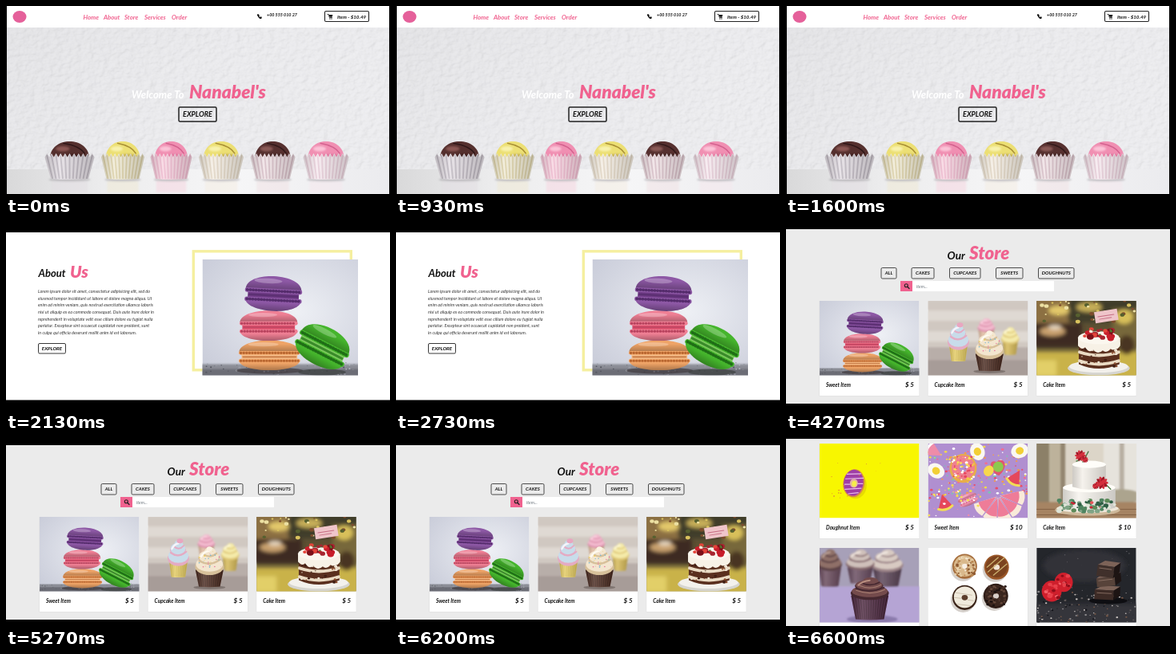
Write an HTML page that moves like this. It is 480 px wide and 236 px high and loops after 8000 ms.

```html
<!DOCTYPE html>
<html lang="en">
<head>
<meta charset="utf-8">
<title>Bakery site tour</title>
<style>
html, body { margin: 0; width: 480px; height: 236px; overflow: hidden; background: #000; }
#stage { display: block; }
text { font-family: Lato, "Open Sans", sans-serif; font-style: italic; font-weight: 700; fill: #111; }
.pink { fill: #f0628f; }
.big { font-weight: 900; }
.thin { font-weight: 400; }
.scene { opacity: 0; animation: 8s step-end infinite; }
#home { animation-name: home; }
#about { animation-name: about; }
#store { animation-name: store; }
#scrolled { animation-name: scrolled; }
@keyframes home { 0% { opacity: 1 } 26.625%, 100% { opacity: 0 } }
@keyframes about { 0% { opacity: 0 } 26.625% { opacity: 1 } 53.375%, 100% { opacity: 0 } }
@keyframes store { 0% { opacity: 0 } 53.375% { opacity: 1 } 80%, 100% { opacity: 0 } }
@keyframes scrolled { 0% { opacity: 0 } 80%, 100% { opacity: 1 } }
</style>
</head>
<body>
<svg id="stage" width="480" height="236" viewBox="0 0 480 236" xmlns="http://www.w3.org/2000/svg"></svg>
<script>
const box = (x, y, w, h, fill, more = '') =>
  `<rect x="${x}" y="${y}" width="${w}" height="${h}" fill="${fill}" ${more}/>`;
const oval = (x, y, rx, ry, fill, more = '') =>
  `<ellipse cx="${x}" cy="${y}" rx="${rx}" ry="${ry}" fill="${fill}" ${more}/>`;
const path = (d, fill, more = '') => `<path d="${d}" fill="${fill}" ${more}/>`;
const line = (d, color, width, more = '') =>
  `<path d="${d}" fill="none" stroke="${color}" stroke-width="${width}" stroke-linecap="round" ${more}/>`;
const text = (s, x, y, size, cls = '', more = '') =>
  `<text x="${x}" y="${y}" font-size="${size}" class="${cls}" ${more}>${s}</text>`;
const soft = (body, level = 1) => `<g filter="url(#blur${level})">${body}</g>`;
const frame = (x, y, w, h, width, fill = 'none') =>
  box(x, y, w, h, fill, `rx="1.5" stroke="#222" stroke-width="${width}"`);
const button = (s, x, y, w, h, size, width) =>
  frame(x, y, w, h, width) + text(s, x + w / 2, y + h / 2 + size * .36, size, '', 'text-anchor="middle"');

const random = seed => () => (seed = seed * 16807 % 2147483647) / 2147483647;

function dots(seed, count, x, y, w, h, r, colors) {
  const rnd = random(seed);
  let out = '';
  for (let i = 0; i < count; i++) {
    const size = r * (.5 + rnd());
    out += oval((x + rnd() * w).toFixed(1), (y + rnd() * h).toFixed(1), size, size * .8,
      colors[Math.floor(rnd() * colors.length)]);
  }
  return out;
}

// Pleated paper cup; y is its upper rim
function cup(x, y, w, h, paper, fold, pleats = 13, jag = .05) {
  const low = .76;
  let rim = '', folds = '';
  for (let i = 0; i <= pleats * 2; i++) {
    const px = x - w / 2 + w * i / (pleats * 2);
    rim += `L${px},${y + h * jag * (i % 2 ? -1 : .6)}`;
    if (i % 2) folds += `M${px},${y}L${x + (px - x) * low},${y + h * .97}`;
  }
  const b = w * low / 2;
  const d = `M${x - b},${y + h}${rim}L${x + b},${y + h}Q${x},${y + h * 1.07} ${x - b},${y + h}z`;
  return path(d, paper) + line(folds, fold, w / pleats * .34, 'opacity=".65"') +
    path(d, 'url(#side)');
}

// Swirled icing sitting on a rim at y
function icing(x, y, w, h, color, dark, light) {
  return oval(x, y - h * .22, w * .5, h * .34, dark) +
    oval(x, y - h * .32, w * .47, h * .3, color) +
    oval(x - w * .02, y - h * .58, w * .37, h * .27, dark) +
    oval(x - w * .02, y - h * .63, w * .35, h * .25, color) +
    oval(x + w * .02, y - h * .82, w * .2, h * .19, color) +
    line(`M${x - w * .36},${y - h * .45}Q${x},${y - h * .2} ${x + w * .37},${y - h * .5}` +
      `M${x - w * .22},${y - h * .74}Q${x + w * .02},${y - h * .52} ${x + w * .25},${y - h * .76}`, dark, h * .07) +
    line(`M${x - w * .3},${y - h * .62}Q${x - w * .2},${y - h * .82} ${x},${y - h * .86}`, light, h * .08);
}

// Low glazed top with a folded fondant ridge
function glaze(x, y, w, h, color, dark, light) {
  const a = w / 2;
  return path(`M${x - a},${y}C${x - a},${y - h * .7} ${x - a * .5},${y - h} ${x},${y - h}` +
    `S${x + a},${y - h * .7} ${x + a},${y}z`, color) +
    soft(oval(x + a * .3, y - h * .12, a * .6, h * .2, dark, 'opacity=".6"') +
      oval(x - a * .35, y - h * .6, a * .35, h * .14, light)) +
    line(`M${x - a * .3},${y - h * .9}Q${x + a * .5},${y - h * .75} ${x + a * .75},${y - h * .35}`, dark, 1.5);
}

function macaron(x, y, w, h, color, dark, cream, turn = 0) {
  const a = w / 2;
  const top = `M${-a},${-h * .1}C${-a},${-h * .63} ${a},${-h * .63} ${a},${-h * .1}z`;
  const low = `M${-a},${h * .16}C${-a},${h * .6} ${a},${h * .6} ${a},${h * .16}z`;
  const ruffle = (v, c) => line(`M${-a + 2},${v}H${a - 2}`, c, h * .13) +
    line(`M${-a + 2},${v}H${a - 2}`, dark, h * .08, 'stroke-dasharray=".5 3.1"');
  return `<g transform="translate(${x} ${y}) rotate(${turn})">` +
    path(low, color) + path(low, 'url(#shade)') + path(top, color) + path(top, 'url(#shade)') +
    box(-a + 3, -h * .06, w - 6, h * .22, cream) +
    ruffle(-h * .08, color) + ruffle(h * .18, color) +
    line(`M${-a + 5},${h * .05}H${a - 5}`, dark, h * .06, 'opacity=".7"') +
    oval(-a * .2, -h * .36, a * .5, h * .07, '#fff', 'opacity=".25"') + '</g>';
}

function berry(x, y, r) {
  return oval(x, y, r, r * 1.05, '#cf1f2c') + dots(r * 97 | 0, 16, x - r * .7, y - r * .7, r * 1.4, r * 1.4, r * .18, ['#f4626a', '#8f0d1a', '#e8404a']);
}

const defs = `<defs>
  <linearGradient id="shade" x2="0" y2="1"><stop offset=".3" stop-color="#000" stop-opacity="0"/><stop offset="1" stop-color="#000" stop-opacity=".28"/></linearGradient>
  <linearGradient id="side"><stop stop-color="#222" stop-opacity=".18"/><stop offset=".3" stop-color="#fff" stop-opacity=".2"/><stop offset="1" stop-color="#222" stop-opacity=".2"/></linearGradient>
  <linearGradient id="wall" x2="1" y2=".5"><stop stop-color="#e2e2e5"/><stop offset=".5" stop-color="#eaeaed"/><stop offset="1" stop-color="#ececef"/></linearGradient>
  <linearGradient id="shelf"><stop stop-color="#d9d9da"/><stop offset=".25" stop-color="#ececed"/><stop offset=".6" stop-color="#f6f6f7"/><stop offset="1" stop-color="#ebebee"/></linearGradient>
  <radialGradient id="studio" cx=".6" cy=".45" r=".75"><stop stop-color="#eef0f5"/><stop offset="1" stop-color="#c9ccd9"/></radialGradient>
  <filter id="blur1"><feGaussianBlur stdDeviation="1"/></filter>
  <filter id="blur2" x="-20%" y="-20%" width="140%" height="140%"><feGaussianBlur stdDeviation="2.6"/></filter>
  <filter id="plaster" x="0" y="0" width="1" height="1" color-interpolation-filters="sRGB">
    <feTurbulence type="fractalNoise" baseFrequency=".12 .16" numOctaves="3" seed="4"/>
    <feDiffuseLighting surfaceScale="1.6" lighting-color="#fff"><feDistantLight azimuth="215" elevation="68"/></feDiffuseLighting>
  </filter>`;

const macarons = box(0, 0, 195, 145, 'url(#studio)') +
  soft(box(-5, 131, 205, 20, '#8b8d96') + box(-5, 137, 205, 12, '#6c6d76')) +
  dots(7, 70, 0, 129, 195, 16, .8, ['#b9bbc4', '#555760', '#9a9ca6']) +
  oval(84, 139, 42, 4, '#3b3437', 'opacity=".6"') + oval(150, 141, 30, 4, '#343a36', 'opacity=".6"') +
  macaron(84, 120, 76, 38, '#efa467', '#b9662f', '#f7c18d') +
  macaron(83, 83, 72, 38, '#ef7f94', '#b8435e', '#e0526f') +
  macaron(89, 43, 70, 44, '#8d58a5', '#552c6c', '#703c87', 3) +
  macaron(151, 109, 66, 50, '#45b52c', '#1f6f16', '#7cc95c', 27);

const cupcakes = box(0, 0, 125, 93, '#d8d1ca') +
  soft([0, 13, 26, 39, 52].map((y, i) => box(-3, y, 131, 11, i % 2 ? '#dfd9d3' : '#d0c8c1')).join('') +
    box(-4, 58, 133, 40, '#b8aea9') + box(-4, 74, 133, 22, '#a79c98')) +
  soft(cup(73, 36, 20, 16, '#e6c2a6', '#d09e82', 7) + icing(73, 37, 22, 15, '#f2b9cd', '#dd92ae', '#ffe0ea')) +
  soft(cup(103, 51, 19, 16, '#dcbf58', '#bd9c3c', 7) + icing(103, 52, 23, 19, '#f4eaa9', '#dfc878', '#fffbe0')) +
  cup(38, 56, 23, 19, '#ead267', '#c7a93f', 9) +
  icing(38, 58, 27, 29, '#c8dcea', '#e4abc3', '#f6f4fa') + oval(40, 30, 4, 3, '#e9a6c0') +
  oval(77, 88, 20, 2.5, '#5b504d', 'opacity=".5"') +
  cup(77, 66, 35, 21, '#4c291d', '#2b150f', 11) +
  icing(77, 69, 36, 31, '#f3e6cf', '#d8c19b', '#fffaf0') + oval(77, 40, 3.5, 3, '#fbf2e2') +
  dots(31, 28, 62, 43, 30, 22, .7, ['#e8799d', '#76b5d0', '#edc84a']);

const berryCake = box(0, 0, 125, 93, '#5d5133') +
  soft(box(-5, -5, 55, 40, '#8c6f43') + box(40, -5, 90, 32, '#3f3d2c') + box(95, 10, 35, 50, '#77683a') +
    box(-5, 28, 62, 30, '#3c2a20') + box(-5, 63, 135, 36, '#c9b24a') + box(-5, 74, 30, 20, '#e2cf67') +
    oval(28, 12, 13, 6, '#e3c86a') + oval(66, 8, 16, 6, '#c6ae59') + oval(110, 20, 11, 9, '#d8c05a') +
    oval(20, 38, 16, 6, '#c9a16e') + oval(23, 33, 8, 3, '#e8d7bf') + oval(113, 55, 10, 12, '#4a3424'), 2) +
  dots(12, 32, 0, 0, 125, 28, 2, ['#d9c25e', '#56602f', '#7d4c2d', '#ece0a2']) +
  box(73, 12, 29, 14, '#efc5ca', 'transform="rotate(-9 87 19)"') + line('M77,20l20,-3M79,23l15,-2.4', '#c66c82', 1) +
  oval(78, 84, 39, 9, '#d6d5d0') + oval(78, 82, 37, 7.5, '#f3f1ec') +
  path('M53,46V79Q78,90 104,79V46z', '#5a2f1e') +
  [53, 64, 75].map(y => line(`M54,${y}Q78,${y + 8} 103,${y}`, '#eadbc4', 4)).join('') +
  dots(19, 34, 55, 52, 47, 30, 1.5, ['#3e1d13', '#f1e7d6', '#8a4d2f']) +
  path('M52,46V56q5,6 9,2q5,8 10,3q6,7 12,1q5,4 10,-2q8,3 12,-4V46z', '#f7f1e6') +
  oval(78, 46, 26, 8, '#fbf7ef') +
  dots(25, 26, 59, 35, 39, 12, 2.9, ['#c81e2b', '#e5443a', '#7d1019', '#a62631']) +
  dots(27, 7, 60, 34, 36, 9, 1.6, ['#4f7a2f', '#f5e7d8']);

const doughnut = box(0, 0, 125, 93, '#f8f600') +
  oval(45, 52, 14, 17, '#d7c600', 'opacity=".5"') +
  '<g transform="translate(-1 1.5) rotate(8 44 48)">' + oval(44, 48, 13.5, 17.5, '#d98d45') +
  oval(43.5, 47.5, 12.2, 16.3, '#a03ea6') +
  line('M34,38l17,-3M33,44l22,-4M33,51l6,-1M48,48l7,-1M34,57l20,-4M39,62l12,-3', '#e6bdea', 1.2) +
  oval(44, 48, 5, 5.6, '#e3b3a0') + oval(44.5, 48.5, 3, 3.6, '#f6ec4a') + '</g>' +
  dots(44, 14, 8, 22, 80, 50, .65, ['#e99027', '#d46f4d']);

const slice = (x, y, turn, color, rind) => `<g transform="translate(${x} ${y}) rotate(${turn})">` +
  path('M0,-10L9,7Q0,12 -9,7z', color) + line('M-9,7Q0,12 9,7', rind, 3) + '</g>';
const egg = (x, y, turn = 0) => `<g transform="rotate(${turn} ${x} ${y})">` +
  oval(x, y, 11, 9, '#faf8f2') + oval(x, y, 5, 4.6, '#f2cf36') + '</g>';
const wedge = turn => `<g transform="translate(88 65) rotate(${turn})">` +
  path('M0,-2L-9,-31Q0,-36 9,-31z', '#f9ead9') + path('M0,-3L-7.5,-25Q0,-28 7.5,-25z', '#ee7c98') + '</g>';
const sweets = box(0, 0, 125, 93, '#b08fd0') +
  dots(51, 190, 0, 0, 125, 70, 1.3, ['#f0d94c', '#ef6e93', '#fff', '#78c8b0', '#f29b4b', '#e94d6a']) +
  egg(10, 34, 30) + egg(62, 10, 70) + egg(115, 9, -20) +
  slice(20, 73, -15, '#e5475b', '#f3dc55') + slice(110, 42, 30, '#e5475b', '#f3dc55') + slice(8, 10, 120, '#ef8ca8', '#fff') +
  oval(44, 31, 17, 18, '#e8ad4a') + oval(44, 30, 14.5, 15, '#ef7f8f') + oval(44, 30, 5, 5.5, '#b08fd0') +
  dots(57, 60, 30, 15, 28, 30, 1.4, ['#f8e552', '#fff', '#f3c944', '#e8455f']) +
  path('M89,40C75,34 76,18 86,23C93,15 104,27 89,40z', '#e0566f') + oval(88, 29, 6.5, 6.5, '#8cc94e') +
  oval(76, 34, 6, 7, '#f7d84c', 'transform="rotate(35 76 34)"') +
  macaron(50, 70, 25, 15, '#ef8fb0', '#c95479', '#fff0f2', -24) +
  [95, 130, 165, 200, 235].map(wedge).join('') +
  dots(63, 30, 0, 48, 64, 43, 1.2, ['#f5df57', '#fff', '#f08ba7']);

const flower = (x, y, r) => [0, 36, 72, 108, 144].map(a =>
  oval(x, y, r, r * .3, a % 72 ? '#9f1826' : '#d32f3c', `transform="rotate(${a} ${x} ${y})"`)).join('');
const weddingCake = box(0, 0, 125, 93, '#dcd5c8') +
  soft(box(-4, -4, 20, 80, '#8c8068') + box(16, -4, 16, 80, '#bdb29b') + box(30, -4, 6, 80, '#93866f') +
    box(84, -4, 48, 80, '#e6e3dc') + box(104, -4, 6, 75, '#b8afa2') + oval(106, 66, 26, 9, '#aca48e') +
    box(-4, 73, 133, 25, '#a68463')) +
  line('M0,82H125M0,89H125', '#7c5a3e', .8) +
  oval(64, 83, 41, 7, '#cdb89a') + oval(64, 81, 39, 5.5, '#efe7d9') +
  path('M33,55V80Q66,89 99,80V55z', '#f5f2ec') + path('M33,55V80Q66,89 99,80V55z', 'url(#side)') +
  oval(66, 55, 33, 6, '#fffdf8') +
  path('M45,26V54Q66,61 87,54V26z', '#f3efe8') + path('M45,26V54Q66,61 87,54V26z', 'url(#side)') +
  oval(66, 26, 21, 4.5, '#fffdf9') +
  line('M58,23l7,-13M83,47l10,10M50,22l10,-4', '#4e7a48', 1.4) +
  flower(55, 15, 7) + flower(61, 20, 4) + flower(82, 49, 8) + flower(74, 53, 4) +
  dots(71, 64, 27, 70, 72, 15, 2.3, ['#4f8460', '#7fa486', '#2f5f45', '#5e8b59', '#dfe5d8']) +
  dots(74, 5, 34, 70, 62, 10, 2, ['#c92534', '#e65358']);

const chocCupcakes = box(0, 0, 125, 93, '#a7a0b8') +
  soft(box(-5, 48, 135, 50, '#b5a4d4') +
    cup(13, 24, 28, 24, '#6b4a5c', '#4a3044', 9) + icing(13, 26, 30, 24, '#8f7068', '#5c4246', '#c0a79b') +
    cup(85, 25, 36, 23, '#5c4457', '#3e2a3c', 9) + icing(85, 27, 40, 25, '#d8cac2', '#9c8488', '#f4ece6') +
    cup(51, 24, 32, 20, '#6a4c60', '#4a3044', 9) + icing(51, 25, 36, 23, '#cfc0ba', '#86696e', '#f2e8e0')) +
  soft(oval(66, 89, 32, 5, '#7a689a', 'opacity=".7"')) +
  cup(63, 59, 47, 30, '#4d2640', '#2b1220', 14) +
  icing(63, 62, 48, 25, '#744b4c', '#452830', '#b98f80') +
  line('M46,53Q64,60 82,52M50,47Q64,53 77,46', '#a57c70', 1.2);

const ring = (x, y, r, dough, top, hole) => oval(x - 2, y + 3, r, r, '#d5d0cb') + oval(x, y, r, r, dough) +
  oval(x, y - .5, r * .88, r * .86, top) + oval(x, y, r * .25, r * .22, hole);
const doughnuts = box(0, 0, 125, 93, '#fff') +
  ring(46, 23, 15.5, '#a56d3c', '#d9b98c', '#f4e9db') +
  dots(81, 60, 34, 11, 24, 24, 1.6, ['#f2e5cd', '#b98753', '#e4cba2', '#8d5930']) + oval(46, 23, 3.2, 3, '#f7efe4') +
  ring(86, 24, 15.5, '#9a5627', '#7b431f', '#f2e4d5') + line('M75,30l21,-18M74,24l14,-12M82,34l17,-14', '#cbb06f', 1.3) +
  ring(46, 62, 15.5, '#3b2419', '#f0eadc', '#5c3d2b') + line('M35,56l20,3M33,62l8,1M50,65l7,1M36,70l17,2', '#cfc3b0', 1) +
  ring(85, 60, 15.5, '#2e1c16', '#3b261e', '#cfc4bc') +
  dots(88, 60, 73, 48, 24, 24, 1.3, ['#1d1210', '#4a3229', '#66493b']) + oval(85, 60, 3.4, 2.8, '#d8cec8');

const block = (x, y, w, h, c, turn) => `<g transform="rotate(${turn} ${x} ${y})">` +
  path(`M${x},${y}l${w * .3},${-h * .45}h${w * .7}l${-w * .25},${h * .45}z`, '#7d6358') +
  box(x, y, w * .75, h, c) + path(`M${x + w * .75},${y}l${w * .25},${-h * .45}v${h}l${-w * .25},${h * .45}z`, '#1d1413') + '</g>';
const chocolate = box(0, 0, 125, 93, '#24262b') +
  soft(oval(60, 22, 52, 20, '#303238') + box(-4, 70, 133, 28, '#34343a'), 2) +
  dots(91, 130, 0, 54, 125, 39, 1, ['#8d8a8d', '#c4bebb', '#5e5858', '#14141a', '#7b5a48']) +
  dots(95, 30, 0, 4, 125, 60, .5, ['#6a686d', '#474850']) +
  oval(90, 66, 24, 4, '#0e0e12') +
  block(73, 52, 32, 12, '#3d2b26', 3) + block(75, 38, 31, 11, '#57433a', -5) + block(77, 21, 28, 14, '#40302b', 8) +
  line('M79,25l15,2M78,41l17,-2M76,56l18,1', '#93796d', .8) +
  berry(34, 43, 11.5) + berry(19, 54, 12.5);

const photo = (x, y, w, h, art, size = '125 93') =>
  `<svg x="${x}" y="${y}" width="${w}" height="${h}" viewBox="0 0 ${size}" preserveAspectRatio="none">${art}</svg>`;

const cards = [
  ['Sweet Item', 5, macarons], ['Cupcake Item', 5, cupcakes], ['Cake Item', 5, berryCake],
  ['Doughnut Item', 5, doughnut], ['Sweet Item', 10, sweets], ['Cake Item', 10, weddingCake],
  ['', 0, chocCupcakes], ['', 0, doughnuts], ['', 0, chocolate]
].map(([name, price, art], i) => {
  const x = 42 + i % 3 * 135.6, y = 99 + Math.floor(i / 3) * 131;
  return box(x - .5, y, 125.5, 119.5, '#dedede') + box(x, y, 124.5, 119, '#fff') +
    photo(x, y, 124.5, 93.5, art, art === macarons ? '195 145' : '125 93') +
    (name && text(name, x + 8, y + 108, 6.6) +
      text('$ ' + price, x + 118, y + 108, 8, '', 'text-anchor="end"'));
}).join('');

const filters = [['ALL', 119, 19], ['CAKES', 157, 28], ['CUPCAKES', 204.5, 38.5], ['SWEETS', 262.5, 33.5], ['DOUGHNUTS', 315.5, 44.5]];
const page = box(0, 0, 480, 520, '#ebebeb') +
  text('Our', 201.5, 47, 13.5) + text('Store', 229, 47, 22.4, 'pink big') +
  filters.map(([s, x, w]) => button(s, x, 57.5, w, 13.5, 6, .8)).join('') +
  box(143, 74, 15, 13, '#f0628f') + box(158, 74, 177, 13, '#fff') +
  line('M152,81.5l2,2', '#222', 1.3) + '<circle cx="150.3" cy="79.8" r="2" fill="none" stroke="#222" stroke-width="1.1"/>' +
  text('item...', 163, 82.5, 5.4, 'thin', 'style="fill:#6c757d"') + cards;

const treats = [
  [79.5, 62, '#e3dde3', '#a79eaa', '#55302e', '#2f1718', '#8a5752'],
  [146, 54, '#efe9d2', '#cdbd84', '#ecdf74', '#a98f35', '#f8f2ae'],
  [206.5, 52, '#f8d3e0', '#e9a3bf', '#f08fb2', '#d3628f', '#fbc3d7'],
  [269, 56, '#f4ede2', '#d6c7ae', '#ecdf74', '#a98f35', '#f8f2ae'],
  [333.5, 56, '#efe0e4', '#c5a5b1', '#56302f', '#331a1b', '#8a5a56'],
  [400, 57, '#f6e8ee', '#dcb9c8', '#f08fb2', '#d3628f', '#fbc3d7']
].map(([x, w, paper, fold, ...top]) =>
  soft(oval(x, 218, w * .42, 2.5, '#9a969c', 'opacity=".5"') + box(x - w * .36, 220, w * .72, 14, paper, 'opacity=".5"')) +
  glaze(x, 193, w * .8, 23, ...top) + cup(x, 188, w, 29, paper, fold, 11, .1)).join('');

const home = box(0, 0, 480, 236, '#000') + box(1, 0, 478, 27, '#fff') +
  oval(17, 13.5, 8.5, 7.5, '#e5609a') +
  [['Home', 96.5], ['About', 122], ['Store', 148], ['Services', 173], ['Order', 207]]
    .map(([s, x]) => text(s, x, 16.5, 7.8, 'pink')).join('') +
  line('M315.2,11.2q.3,3.6 3.6,4', '#111', 1.5) + line('M314.9,11.2l.8,.8M317.7,15l1,-.6', '#111', 2) +
  text('+00 555 010 27', 326, 12.5, 5.4) + frame(398.5, 6.5, 55, 13, 1.1) +
  line('M402,10.5h1.3l1,4h3.2', '#111', .8) + path('M403.8,11h4.6l-.8,2.8h-3.2z', '#111') +
  oval(404.9, 16, .7, .7, '#111') + oval(407, 16, .7, .7, '#111') +
  text('Item - $10.49', 414, 15.5, 6.2) +
  box(1, 27, 478, 209, 'url(#wall)') + box(1, 27, 478, 178, '#fff', 'filter="url(#plaster)" opacity=".16"') +
  box(1, 205, 478, 31, 'url(#shelf)') + treats +
  text('Welcome To', 157, 116, 13, '', 'style="fill:#fff"') + text("Nanabel's", 229, 116, 22.7, 'pink big') +
  button('EXPLORE', 216, 127, 47, 18, 9, 1.5);

const copy = [
  'Lorem ipsum dolor sit amet, consectetur adipisicing elit, sed do',
  'eiusmod tempor incididunt ut labore et dolore magna aliqua. Ut',
  'enim ad minim veniam, quis nostrud exercitation ullamco laboris',
  'nisi ut aliquip ex ea commodo consequat. Duis aute irure dolor in',
  'reprehenderit in voluptate velit esse cillum dolore eu fugiat nulla',
  'pariatur. Excepteur sint occaecat cupidatat non proident, sunt',
  'in culpa qui officia deserunt mollit anim id est laborum.'];
const about = box(0, 0, 480, 236, '#000') + box(0, 13, 480, 210.5, '#fff') +
  text('About', 40.5, 69, 13) + text('Us', 80, 70, 21, 'pink big') +
  copy.map((s, i) => text(s, 40, 89 + i * 8.65, 5.45, 'thin', 'style="fill:#333"')).join('') +
  button('EXPLORE', 40.5, 152.5, 34, 12.5, 6.2, .9) +
  box(234.3, 36.8, 197, 149, 'none', 'stroke="#f5ef9f" stroke-width="3.4"') +
  photo(245.5, 47, 194.5, 145.5, macarons, '195 145');

const scene = (id, body) => `<g id="${id}" class="scene">${body}</g>`;
document.getElementById('stage').innerHTML = defs + `<g id="page">${page}</g></defs>` +
  scene('home', home) + scene('about', about) +
  scene('store', '<use href="#page"/>' + box(0, 0, 480, 9, '#000') + box(0, 228, 480, 8, '#000')) +
  scene('scrolled', '<use href="#page" y="-223"/>' + box(0, 0, 480, 1, '#000'));
</script>
</body>
</html>
```
